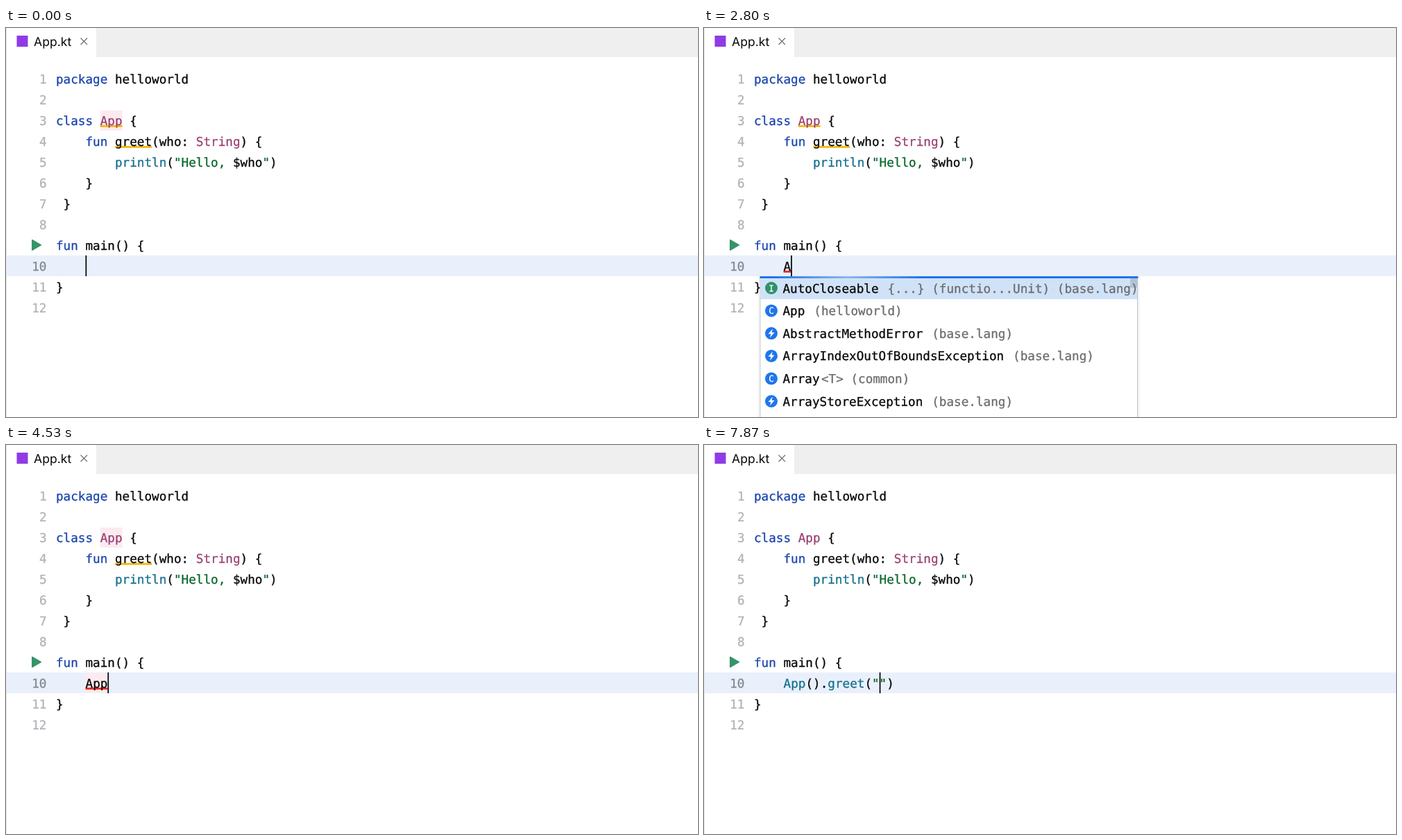
Write an HTML page that moves like this. It is 997 px wide and 561 px high and loops after 8000 ms.

```html
<!DOCTYPE html>
<html lang="en">
<head>
<meta charset="utf-8">
<title>Code completion</title>
<style>
  html, body { margin: 0; width: 100%; height: 100%; overflow: hidden; background: #fff; }
  svg { display: block; width: 100%; height: 100%; }
  text {
    font: 17.65px "DejaVu Sans Mono", monospace;
    white-space: pre;
    text-rendering: geometricPrecision;
    color: #080808;
  }
  text, tspan { fill: currentColor; stroke: currentColor; stroke-width: .3px; }
  text.tab { font: 17.6px Inter, sans-serif; stroke: none; }
  .num { color: #b0b2b8; text-anchor: end; }
  .num.now { color: #83868e; }
  .kw { color: #1a45ad; }
  .type { color: #9b4274; }
  .call { color: #17718f; }
  .str { color: #07662a; }
  .dim { color: #6c6c6c; }
  .end { text-anchor: end; }
  .letter { font-size: 12.5px; color: #fff; text-anchor: middle; }
</style>
</head>
<body>
<svg viewBox="0 0 997 561">
  <defs>
    <linearGradient id="flow" gradientUnits="userSpaceOnUse" x1="0" x2="545" spreadMethod="repeat">
      <stop offset="0" stop-color="#1f74ea"/>
      <stop offset=".3" stop-color="#1f74ea"/>
      <stop offset=".5" stop-color="#8db6f0"/>
      <stop offset=".7" stop-color="#1f74ea"/>
      <stop offset="1" stop-color="#1f74ea"/>
    </linearGradient>
    <filter id="shadow" x="-5%" y="-5%" width="110%" height="110%">
      <feDropShadow dx="0" dy="2" stdDeviation="2" flood-opacity=".16"/>
    </filter>
  </defs>
  <rect width="997" height="561" fill="#fff"/>
  <rect x="130" width="867" height="42" fill="#efefef"/>
  <rect x="1" y="328" width="996" height="30" fill="#e9f0fb"/>
  <rect width="1" height="561" fill="#e4e4e4"/>
  <rect x="15.5" y="11" width="16" height="16" fill="#8f3be6"/>
  <text class="tab" x="40" y="26">App.kt</text>
  <path d="M107.5 14.5l9.5 9.5m0-9.5l-9.5 9.5" stroke="#6f6f6f" stroke-width="1.2"/>
  <path d="M38 306l12 7-12 7z" fill="#369468" stroke="#369468" stroke-width="2" stroke-linejoin="round"/>
  <g id="marks"></g>
  <g id="code"></g>
  <g id="edit"></g>
  <g id="popup"></g>
</svg>
<script>
const LOOP = 8000, CHAR = 10.63, LEFT = 72, PITCH = 29.97, ROW = 32.65;
const YELLOW = '#f5b90d', RED = '#ee2a24', PINK = '#fbebf0';
const byId = id => document.getElementById(id);

const span = name => text => `<tspan class="${name}">${text}</tspan>`;
const [kw, type, call, str] = ['kw', 'type', 'call', 'str'].map(span);
const dim = text => `<tspan class="dim" dx="2.3">${text}</tspan>`;

const colX = col => LEFT + col * CHAR;
const baseline = line => 80 + (line - 1) * PITCH;
const text = (x, y, content, cls = '') => `<text x="${x}" y="${y}" class="${cls}">${content}</text>`;
const rect = (x, y, w, h, fill, extra = '') =>
  `<rect x="${x}" y="${y}" width="${w}" height="${h}" fill="${fill}" ${extra}/>`;
const underline = (line, col, count, color) =>
  rect(colX(col), baseline(line) + 0.2, count * CHAR, 2.8, color);
const shade = (line, col, count) =>
  rect(colX(col), baseline(line) - 21, count * CHAR, 29, PINK);

const lines = [
  kw('package') + ' helloworld',
  '',
  kw('class') + ' ' + type('App') + ' {',
  '    ' + kw('fun') + ' greet(who: ' + type('String') + ') {',
  '        ' + call('println') + '(' + str('"Hello, ') + '$who' + str('"') + ')',
  '    }',
  ' }',
  '',
  kw('fun') + ' main() {',
  '',
  '}',
  ''
];
byId('code').innerHTML = lines.map((content, i) => {
  const n = i + 1, y = baseline(n);
  const number = n === 9 ? '' : text(58.5, y, n, n === 10 ? 'num now' : 'num');
  return number + text(LEFT, y, content);
}).join('');

const bolt = 'M2 -6.5L-4.5 1H-.6L-2 6.5 4.5 -1.2H.6z';
const icon = (x, y, kind) => {
  const fill = { I: '#2f9268', m: '#d9486e', f: '#d9486e' }[kind] || '#1f76ea';
  const glyph = kind === '!'
    ? `<path d="${bolt}" transform="translate(${x} ${y})" fill="#fff"/>`
    : text(x, y + 4.5, kind, 'letter');
  return `<circle cx="${x}" cy="${y}" r="9" fill="${fill}"/>` + glyph;
};

const lists = {
  types: { x: 81, width: 543.5, rows: [
    ['I', 'AutoCloseable ' + dim('{...} (functio...Unit) (base.lang)')],
    ['C', 'App ' + dim('(helloworld)')],
    ['!', 'AbstractMethodError ' + dim('(base.lang)')],
    ['!', 'ArrayIndexOutOfBoundsException ' + dim('(base.lang)')],
    ['C', 'Array' + dim('&lt;T&gt; (common)')],
    ['!', 'ArrayStoreException ' + dim('(base.lang)')]
  ] },
  members: { x: 145, width: 545, rows: [
    ['m', 'greet' + dim('(who: String)'), 'Unit'],
    ['m', 'equals' + dim('(other: Any?)'), 'Boolean'],
    ['m', 'hashCode' + dim('()'), 'Int'],
    ['m', 'toString' + dim('()'), 'String'],
    ['f', 'to' + dim('(that: B) for A'), 'Pair&lt;App, B&gt;'],
    ['f', 'run ' + dim('{...} (block: App.() -&gt; R)'), 'R']
  ] }
};

function drawPopup({ list, selected }) {
  if (!list) return '';
  const { x, width, rows } = lists[list];
  const items = rows.map(([kind, label, result], i) => {
    const y = 375 + i * ROW;
    return icon(x + 16, y, kind) + text(x + 32.5, y + 6.5, label) +
      (result ? text(x + width - 8, y + 6.5, result, 'dim end') : '');
  });
  return rect(x, 359, width, 230, '#fff', 'stroke="#c4c7cc" filter="url(#shadow)"') +
    rect(x + 0.5, 358.5 + selected * ROW, width - 1, ROW, '#d0e2f7') +
    items.join('') +
    (list === 'types'
      ? rect(x - 0.5, 358, width + 1.5, 3, 'url(#flow)') +
        rect(x + width - 10.5, 361, 10, 13.5, '#68727e', 'id="thumb"')
      : '');
}

// Each step changes part of the editor state at the given time.
const steps = [
  [0, { code: '', caret: 4, shaded: true, warnApp: true, warnGreet: true, error: null, list: null, selected: 0 }],
  [470, { caret: null }],
  [930, { code: 'A', caret: 5, shaded: false }],
  [1070, { error: [4, 1] }],
  [1270, { tall: true }], [1330, { tall: false }],
  [1470, { tall: true }], [1530, { tall: false }],
  [1670, { tall: true }], [1730, { tall: false }],
  [1870, { tall: true }], [1930, { tall: false, list: 'types' }],
  [3470, { selected: 1 }],
  [3930, { code: 'App', caret: 7, list: null, selected: 0, error: null }],
  [4070, { shaded: true, shadedUse: true }],
  [4530, { warnApp: false, error: [4, 3] }],
  [4870, { code: 'App()', caret: 8, shaded: false, shadedUse: false, error: null }],
  [5130, { caret: 9 }],
  [5470, { code: call('App') + '()' }],
  [5730, { code: call('App') + '().', caret: 10 }],
  [5800, { error: [10, 1] }],
  [5870, { list: 'members' }],
  [6530, { code: call('App') + '().greet()', caret: 16, list: null, error: null }],
  [7000, { code: call('App') + '().' + call('greet') + '()', warnGreet: false, error: [16, 1] }],
  [7330, { caret: null }],
  [7530, { code: call('App') + '().' + call('greet') + '(' + str('""') + ')', caret: 17, error: [18, 1] }],
  [7870, { error: null }]
];
let state = {};
const states = steps.map(([, change]) => (state = { ...state, ...change }));

function drawState(s) {
  byId('marks').innerHTML =
    (s.shaded ? shade(3, 6, 3) : '') +
    (s.shadedUse ? shade(10, 4, 3) : '') +
    (s.warnApp ? underline(3, 6, 3, YELLOW) : '') +
    (s.warnGreet ? underline(4, 8, 5, YELLOW) : '') +
    (s.error ? underline(10, ...s.error, RED) : '');
  const grow = s.tall ? 2.5 : 0;
  byId('edit').innerHTML = text(colX(4), baseline(10), s.code) +
    (s.caret === null ? '' : rect(colX(s.caret), 328 - grow, 1.7, 30 + 2 * grow, '#000'));
  byId('popup').innerHTML = drawPopup(s);
}

const start = performance.now();
let shown = -1;
function frame() {
  const t = (performance.now() - start) % LOOP;
  const index = steps.findLastIndex(([time]) => time <= t);
  if (index !== shown) drawState(states[shown = index]);
  const shift = 365 - 272.5 + (t - 3330) * 0.3;
  byId('flow').setAttribute('gradientTransform', `translate(${shift})`);
  const thumb = byId('thumb');
  if (thumb) thumb.setAttribute('opacity', Math.max(0, Math.min(1, (2900 - t) / 300)) * 0.85);
  requestAnimationFrame(frame);
}
frame();
</script>
</body>
</html>
```
